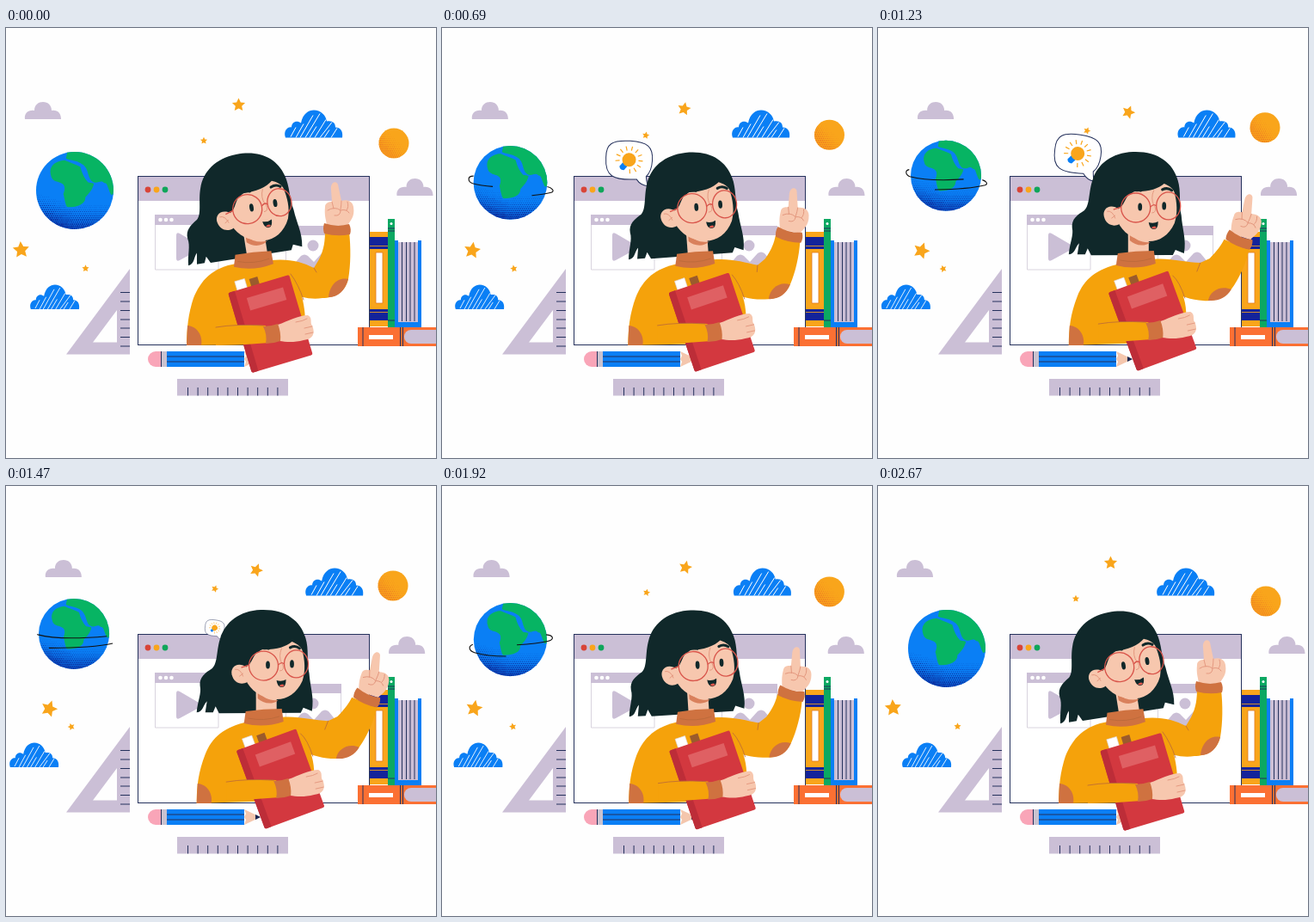
An HTML page for the animation above (2.73 s loop, 500 by 500 pixels).

```html
<!DOCTYPE html>
<html lang="en">
<head>
<meta charset="utf-8">
<title>Online lesson</title>
<style>
html, body { margin: 0; width: 100%; height: 100%; overflow: hidden; background: #fefefe; }
svg { display: block; width: 100%; height: 100%; }
.lilac { fill: #cbbfd6; } .blue { fill: #0a7ff5; } .gold { fill: #f9a51b; } .navy { fill: #1a2550; }
.skin { fill: #f7c7ae; } .hair { fill: #10282a; } .knit { fill: #f5a20b; } .cuff { fill: #cf7240; }
.line { fill: none; stroke: #25315c; stroke-width: 1; }
.fold { fill: none; stroke: #b9693a; stroke-width: .8; stroke-linecap: round; }
.crease { fill: none; stroke: #e2957c; stroke-width: .9; stroke-linecap: round; }
.glass { fill: none; stroke: #d9554b; stroke-width: 1.3; }
.orbit { fill: none; stroke: #111; stroke-width: 1.2; }
</style>
</head>
<body>
<svg viewBox="0 0 500 500">
<defs>
  <path id="star" d="M0-10 3-3.7 9.5-3.1 4.6 1.7 5.9 8.1 0 5-5.9 8.1-4.6 1.7-9.5-3.1-3-3.7Z"/>
  <path id="puff" d="M0 20C-1 13 4 9 11 10 11 3 16 0 21 0 27 0 31 4 31 10 38 9 42 13 42 20Z"/>
  <g id="cloud">
    <path class="blue" d="M1 32C-2 24 4 19 8 20 8 14 14 11 19 15 21 4 28 0 34 0 42 0 48 6 49 13 56 12 59 15 59 20 66 20 68 26 67 32Z"/>
    <path d="M7 31 13 20M13 32 22 16M18 32 33 6M24 32 41 4M29 32 37 19M35 32 48 11M41 32 55 14M46 32 52 23M54 32 61 21" stroke="#fff" stroke-width="1"/>
  </g>
  <clipPath id="disc"><circle r="45"/></clipPath>
  <clipPath id="ballDisc"><circle r="17.5"/></clipPath>
</defs>

<!-- browser window -->
<rect x="153.5" y="172.5" width="269" height="196" fill="#fff"/>
<path class="lilac" d="M153 173h270v28H153z"/>
<rect class="line" x="153.5" y="172.5" width="269" height="196"/>
<g><circle cx="165" cy="188" r="3.4" fill="#d84438"/><circle class="gold" cx="175" cy="188" r="3.4"/><circle cx="185" cy="188" r="3.4" fill="#0fa65a"/></g>
<path d="M173.500 218h73.500v63h-73.500zM325.500 231h64v48h-64z" fill="#fff" stroke="#d9d4de"/>
<path class="lilac" d="M173 217h74v12h-74zM325 230h65v11h-65zM198 241q0-4 4-2l24 14q3 2 0 4l-24 13q-4 2-4-2zM331 279 343 265q4-3 8 0l7 7 9-10q4-3 8 0l14 17z"/>
<circle class="lilac" cx="357" cy="253" r="6.500"/>
<g fill="#fff"><circle cx="179.500" cy="223" r="2.300"/><circle cx="186" cy="223" r="2.300"/><circle cx="192.500" cy="223" r="2.300"/></g>

<!-- stationery -->
<path class="lilac" fill-rule="evenodd" d="M144 280V379.500H70zM129 328V365.500H101z"/>
<path class="line" d="M133 307.500h11m-11 10.500h11m-11 10.500h11m-11 10.500h11m-11 10h11m-11 10.500h11m-11 10.500h11"/>
<path class="lilac" d="M199 408h129v19.500H199z"/>
<path class="line" d="M211.500 418v9.500" id="tick"/>
<g id="ticks"></g>
<path d="M181 376h-7a9 9 0 0 0 0 18h7z" fill="#f9a5b8"/>
<path d="M180 376h7v18h-7z" fill="#c9c2d0"/>
<path class="blue" d="M187 376h90v18h-90z"/>
<path d="M277 376 296 385 277 394 279 388 277 385 279 381z" fill="#f4c6ad"/>
<path class="navy" d="M290 382 296 385 290 388z"/>
<path class="line" d="M180.500 376v18M187 382h90M187 388h90"/>

<!-- books -->
<path class="gold" d="M423 237h22v110h-22z"/>
<path d="M423 243h22v14h-22zM423 327h22v13h-22z" fill="#13239a"/>
<path d="M423 253.500h22M423 330.500h22" stroke="#f9a51b" stroke-width=".8"/>
<path d="M430 261h8v59h-8z" fill="#fff" stroke="#e07a20" stroke-width=".8"/>
<path class="blue" d="M451 247h5v95h23v-95h4v101h-32z"/>
<path class="lilac" d="M456 249h23v93h-23z"/>
<path class="line" d="M460.500 249v92m5-92v92m4.500-92v92m5-92v92" stroke-width=".7"/>
<path d="M444 222h8v126h-8z" fill="#0ba862"/>
<path class="line" d="M444 233h8m-8 3h8m-8 104h8"/>
<circle cx="448" cy="227.500" r="1.500" fill="#fff"/>
<path d="M409 348h91v22h-91z" fill="#fb7033"/>
<path class="lilac" d="M500 351h-29a8 8 0 0 0 0 16h29z"/>
<path class="line" d="M415 348v22M458.500 348v22M461.500 348v22"/>
<path d="M422 357h28v5h-28z" fill="#fff"/>

<!-- floating things -->
<use id="puffL" href="#puff" class="lilac"/><use id="puffR" href="#puff" class="lilac"/>
<use id="cloudR" href="#cloud"/><use id="cloudL" href="#cloud"/>
<use id="star1" href="#star" class="gold"/><use id="star2" href="#star" class="gold"/>
<use id="star3" href="#star" class="gold"/><use id="star4" href="#star" class="gold"/>
<g id="ball"><circle class="gold" r="17.500"/><g id="ballDots" clip-path="url(#ballDisc)" fill="#ee7d22"></g></g>
<g id="globe">
  <circle class="blue" r="45"/>
  <g clip-path="url(#disc)">
    <g id="globeDots" fill="#0b2c9c"></g>
    <g fill="#07b463" stroke="#0a7ff5" stroke-width="1.300">
      <path d="M-29-20C-30-30-22-35-12-36-6-33 2-31 7-28 9-20 12-14 16-10L23-9C22 0 16 4 13 8 13 16 4 20-8 20-12 20-12 10-14 4-10-6-14-8-22-10-28-12-28-16-29-20Z"/>
      <path d="M-9-46H46V4L42 6C37-2 38-9 34-8 30-14 27-5 20-10 13-14 17-26 7-31 0-35-6-34-11-37Z"/>
    </g>
  </g>
  <g id="orbitOut"><path class="orbit" pathLength="1" d="M-45-8C-53-8-52-1-46 1-20 8 20 5 42 3"/><path class="orbit" pathLength="1" d="M45 5C50 6 55 10 50 12 30 17-5 18-32 18"/></g>
  <g id="orbitBack"><path class="orbit" pathLength="1" d="M-46 6C-52 8-51 14-44 16-20 23 20 21 44 16"/><path class="orbit" pathLength="1" d="M44-6C54-5 54 0 46 2 25 7 0 6-42 10"/></g>
</g>

<g id="bubble">
  <path class="line" style="fill:#fff" d="M-50-30C-51-46-44-51-23-51-3-51 4-46 4-30 4-18 1-14-2-11-1-5-1-3 1 0-5 0-10-3-13-7-40-4-50-8-50-30Z"/>
  <g transform="translate(-23 -29) rotate(38)">
    <path class="blue" d="M-3.500 7h7v6q-3.500 3-7 0z"/><circle class="gold" r="8"/>
    <g id="rays" stroke="#f9a51b" stroke-width="1.200"></g>
  </g>
</g>

<!-- teacher -->
<g id="head"><g transform="translate(-300 -262)">
  <path class="hair" d="M297 144C325 143 343 156 349 177 353 190 350 205 353 218 354 234 359 246 356 262L346 258 343 264H248L244 256 241 263H232L234 250C229 255 230 262 222 263 223 250 228 241 226 232 225 222 232 217 240 212 247 206 245 190 250 176 256 158 272 145 297 144Z"/>
  <path class="skin" d="M291 230H315V268H291Z"/>
  <path d="M293 239C300 247 308 250 317 249 310 255 299 253 293 247Z" fill="#d9805c"/>
  <path class="skin" d="M281 211C270 203 261 210 263 219 265 228 273 232 281 228Z"/>
  <path class="skin" d="M280 210C287 207 287 196 296 190 314 191 326 187 333 181 338 183 343 186 345 191 348 203 349 215 345 227 338 242 326 249 313 248 296 246 285 238 279 225Z"/>
  <path class="crease" d="M267 213q6-1 9 8m-4 0 4-3"/>
  <path d="M293 192Q299 186 306 189M331 188Q337 185 342 189" fill="none" stroke="#10282a" stroke-width="3" stroke-linecap="round"/>
  <path class="crease" d="M321 189Q317 198 321 206M322 207q3 8-3 8" stroke="#c97762"/>
  <ellipse class="hair" cx="305" cy="208" rx="2.400" ry="4.600"/><ellipse class="hair" cx="333" cy="207" rx="2.400" ry="4.600"/>
  <g class="glass"><circle cx="300" cy="209" r="17"/><ellipse cx="338" cy="207" rx="14" ry="16"/><path d="M317 208q4-4 7-1M283 208 274 211"/></g>
  <path class="hair" d="M315 226Q321 228 326 225 326 234 321 234 316 234 315 226Z"/>
  <path d="M318 232q4-3 6 0-3 3-6 0z" fill="#e0584c"/>
</g></g>

<path class="knit" data-to="M282 274 C254 280 240 292 232 312 C224 332 222 350 222 369 L318 366 L358 342 C360 325 356 312 351 302 L341 280 L322 269Z"
  d="M268 274 C240 278 226 294 218 314 C212 332 210 350 210 369 L306 368 L348 345 C348 330 346 320 344 312 L330 280 L310 270Z"/>
<path class="knit" data-to="M320 269 C340 267 358 273 375 273 L386 268 C395 259 400 252 403 246 L432 258 C428 275 420 292 411 304 C404 315 392 318 378 317 C365 316 350 312 343 306Z"
  d="M308 270 C330 268 344 272 358 279 L364 269 C370 258 371 246 371 236 L399 237 C401 255 401 275 398 292 C394 308 382 314 368 314 C355 316 340 313 332 308Z"/>
<path class="cuff" data-to="M411 304 C398 299 386 306 384 317 C396 318 405 314 411 304Z" d="M398 292 C385 289 376 300 375 313 C386 313 394 306 398 292Z"/>
<path class="cuff" data-to="M223 346 C234 347 241 357 239 369 L222 369Z" d="M211 346 C222 347 229 357 227 369 L210 369Z"/>
<path class="fold" data-to="M375 273 L371 283 M343 288 Q351 295 357 314" d="M358 279 L361 284 M331 286 Q340 298 346 316"/>
<g id="collar"><path class="cuff" d="M-21 0Q0-3 21-3L23 12Q0 20-23 14Z"/><path class="fold" d="M-18 8Q0 12 18 6" stroke="#9f4f2b"/></g>

<g id="book">
  <path d="M-26-59h12v14h-12z" fill="#fff" stroke="#ddd5dc" stroke-width=".6"/><path d="M-9-57H1v12H-9z" fill="#9b5b2c"/>
  <rect x="-37" y="-48.500" width="74" height="97" rx="2" fill="#d3383f"/>
  <path d="M-37-46.500q0-2 2-2h6v97h-6q-2 0-2-2z" fill="#bd2d38"/>
  <path d="M-18-36.500h44v15h-44z" fill="#df6063"/>
</g>
<g id="grip">
  <path class="knit" d="M244 348Q270 344 302 346L306 366Q275 369 244 369Z"/>
  <path class="fold" d="M244 348Q268 344 299 346"/>
  <path class="skin" d="M316 345C328 341 340 334 351 334 357 337 353 343 356 346 360 355 357 362 346 363 335 366 325 365 318 364Z"/>
  <path class="crease" d="M337 342q8-1 13-4M347 349l9-2M348 356l9-2"/>
  <path class="cuff" d="M299 347Q308 347 316 344 320 354 319 364 311 367 302 367 304 357 299 347Z"/>
</g>
<g id="hand">
  <path class="skin" d="M-12-3C-13-10-15-14-14-24-14-29-9-30-6-30L-7-44C-8-53-1-55 1-50L5-31C11-33 18-31 19-24 21-12 15-8 12-2Z"/>
  <path class="crease" d="M-6-30 -4-22M5-31Q5-26 4-21M12-30Q14-24 11-20M-11-20Q-3-25 4-20 4-13-3-14M4-20Q11-22 14-17"/>
</g>
<path id="wrist" class="cuff" d="M-15-5Q0 0 14-4 17 2 15 8 0 11-15 7-17 1-15-5Z"/>
</svg>

<script>
const CYCLE = 2730, SWING = 2670, STEP = 30;
const $ = id => document.getElementById(id);
const mix = (a, b, p) => a + (b - a) * p;
const clamp = v => Math.max(0, Math.min(1, v));
const repeat = (n, draw) => Array.from({ length: n }, (_, i) => draw(i)).join("");

// Rest and far pose of each part: x, y, angle, scale x, scale y
const poses = {
  puffL: [[22, 86], [46.5, 86]],
  puffR: [[454.5, 175], [445, 175]],
  cloudR: [[324, 95.5], [348.7, 95.5]],
  cloudL: [[28, 298.5, 0, .85, .89], [3.4, 298.5, 0, .85, .89]],
  star1: [[270.5, 89.5, 0, .8], [291.5, 98, 22, .8]],
  star2: [[230, 131, 0, .43], [243.2, 119.2, 22, .43]],
  star3: [[17.5, 258, -4], [51, 259, 20]],
  star4: [[92.5, 279.5, 0, .43], [75.5, 280, -20, .43]],
  ball: [[451, 134], [450, 115.5]],
  globe: [[80, 189], [79, 171.5, 0, .91]],
  head: [[289, 263, -9], [300, 262, 0]],
  collar: [[287.5, 263, -2], [300, 262, 0]],
  book: [[307.5, 344, -16.5], [319.5, 340.5, -20.2]],
  grip: [[0, 0], [12.5, -4]],
  hand: [[385, 232, 0], [421.5, 245, 16]],
  wrist: [[385, 232, 0], [421.5, 245, 22]]
};

function place(id, x, y, angle = 0, sx = 1, sy = sx) {
  $(id).setAttribute("transform", `translate(${x} ${y}) rotate(${angle}) scale(${sx} ${sy})`);
}

const numbers = /-?[\d.]+/g;
const morphs = [...document.querySelectorAll("[data-to]")].map(el =>
  ({ el, from: el.getAttribute("d"), to: el.dataset.to.match(numbers) }));

function halftone(id, radius, step, size) {
  let dots = "", row = 0;
  for (let y = -radius; y <= radius; y += step, row++)
    for (let x = -radius + row % 2 * step / 2; x <= radius; x += step) {
      const r = size(x, y);
      if (r > .2) dots += `<circle cx="${x}" cy="${y}" r="${r.toFixed(2)}"/>`;
    }
  $(id).innerHTML = dots;
}
halftone("globeDots", 45, 2.4, (x, y) => (y - 11 - x * .15 + Math.abs(x) * .15) / 27);
halftone("ballDots", 17.5, 2.4, (x, y) => Math.min(.9, (y - x + 14) / 32));

$("ticks").innerHTML = repeat(9, i => `<use href="#tick" x="${(i + 1) * 11.6}"/>`);
$("rays").innerHTML = repeat(11, i => `<path d="M0-11v-5" transform="rotate(${i * 27 - 135})"/>`);

function trim(id, start, end) {
  for (const path of $(id).children) {
    path.style.display = end > start ? "" : "none";
    path.style.strokeDasharray = `0 ${start} ${Math.max(0, end - start)} 9`;
  }
}

function draw(t) {
  const p = (1 - Math.cos(2 * Math.PI * t / SWING)) / 2;
  for (const id in poses) {
    const [a, b] = poses[id];
    const full = v => [v[0], v[1], v[2] ?? 0, v[3] ?? 1, v[4] ?? v[3] ?? 1];
    const to = full(b);
    place(id, ...full(a).map((v, i) => mix(v, to[i], p)));
  }
  for (const { el, from, to } of morphs) {
    let i = 0;
    el.setAttribute("d", from.replace(numbers, n => mix(+n, +to[i++], p)));
  }
  const pop = Math.min(clamp((t - 120) / 240), clamp((1570 - t) / 240));
  place("bubble", 225 + 26 * p, 190 - 12 * p, 11 * (p - .2), pop);

  const outward = t < 1600;
  trim("orbitOut", clamp((t - 1200) / 2000), outward ? clamp((t - 200) / 1270) : 0);
  trim("orbitBack", 0, outward ? 0 : clamp((2600 - t) / 1300));
}

const begin = performance.now();
function loop() {
  const t = (performance.now() - begin) % CYCLE;
  draw(Math.min(SWING, Math.floor(t / STEP) * STEP));
  requestAnimationFrame(loop);
}
loop();
</script>
</body>
</html>
```
